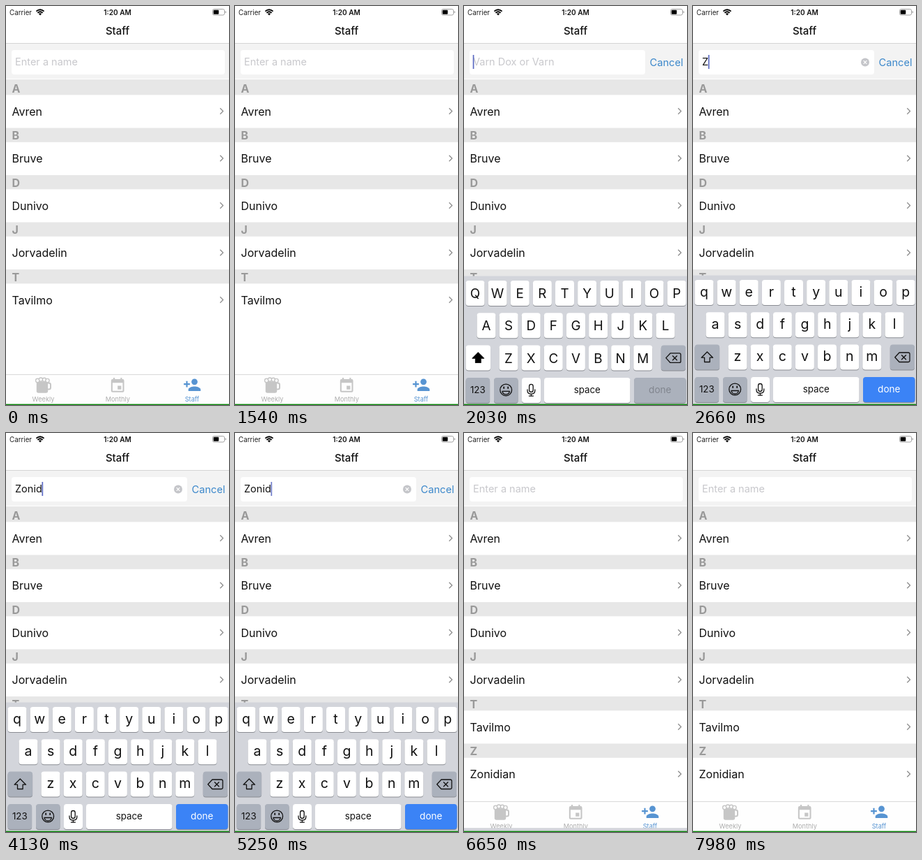
These frames come from a looping animation (320x571 px, 8000 ms). An HTML page:

```html
<!DOCTYPE html>
<html lang="en">
<head>
<meta charset="utf-8">
<title>Staff list</title>
<style>
html, body { margin: 0; width: 100%; height: 100%; overflow: hidden; background: #fff; }
svg { display: block; width: 100vw; height: 100vh; font-family: Inter, Roboto, sans-serif; }
.mid { text-anchor: middle; }
.hidden { display: none; }
.cap { fill: #fff; }
.mod { fill: #abb1bc; }
.line { fill: none; stroke: #111; stroke-width: 1.3; stroke-linejoin: round; stroke-linecap: round; }
</style>
</head>
<body>
<svg id="stage" viewBox="0 0 320 571" preserveAspectRatio="none"></svg>
<script>
const LOOP = 8000;
const FOCUS = 1610, RISE = 1648, DONE = 6300, FALL = 6370, ADDED = 6440;
const KEYBOARD_HEIGHT = 185;
const NAME = 'Zonidian';
const TYPED_AT = [2170, 3290, 3780, 4130, 4130, 5320, 5530, 5810];
// [time, cursor opacity], linear in between
const BLINK = [[2660, 1], [2940, 0], [3150, 0], [3500, 1], [3650, 1], [3990, 0], [4129, 0], [4130, 1],
  [4220, 1], [4550, 0], [4700, 0], [5040, 1], [5200, 1], [5319, .7], [5320, 1]];

const rect = (x, y, w, h, fill, r = 0, extra = '') =>
  `<rect x="${x}" y="${y}" width="${w}" height="${h}" rx="${r}" fill="${fill}" ${extra}/>`;
const text = (x, y, size, value, fill = '#111', extra = '') =>
  `<text x="${x}" y="${y}" font-size="${size}" fill="${fill}" ${extra}>${value}</text>`;

function statusBar() {
  return text(5, 12.6, 9.8, 'Carrier', '#222') +
    `<g fill="none" stroke="#000" stroke-width="1.9">
      <path d="M43.4 7.6Q49 2.7 54.6 7.6M45.4 9.9Q49 6.8 52.6 9.9"/></g>
    <path d="M49 13.4l-2.2-2.3q2.2-1.7 4.4 0z"/>` +
    text(160, 12.6, 10.1, '1:20 AM', '#111', 'class="mid" font-weight="600"') +
    rect(296.5, 4.5, 17, 8.5, 'none', 2.2, 'stroke="#999" stroke-width=".9"') +
    rect(297.7, 5.7, 7.6, 6.1, '#000', 1) +
    '<path d="M314.6 7v3.4q1.4-.5 1.4-1.7t-1.4-1.7" fill="#999"/>' +
    text(160, 41, 15, 'Staff', '#111', 'class="mid" font-weight="500"') +
    rect(0, 53, 320, 1, '#d4d4d4');
}

function searchBar() {
  return rect(0, 54, 320, 50, '#f3f3f3') +
    rect(8, 63, 306, 35, '#fff', 4, 'id="field"') +
    text(13, 85.3, 14.5, '', '#c8c8cc', 'id="hint"') +
    text(13, 85.3, 14.5, '', '#111', 'id="entry"') +
    rect(13, 70, 1.7, 20, '#5a69c2', 0, 'id="cursor"') +
    `<g id="clear"><circle cx="247" cy="80.5" r="6" fill="#c5c6ca"/>
      <path d="M244.7 78.2l4.6 4.6m0-4.6l-4.6 4.6" stroke="#fff" stroke-width="1.2"/></g>` +
    text(290.5, 85.5, 14.6, 'Cancel', '#3c88cb', 'id="cancel" class="mid"');
}

function listSection(name, i) {
  const y = 107 + 67.5 * i, top = i ? y : 105;
  return `<g ${i === 5 ? 'id="added"' : ''}>` +
    rect(0, top, 320, y + 20.3 - top, '#e7e7e7') +
    text(8.5, y + 16.6, 16, name[0], '#999', 'font-weight="700"') +
    text(8.5, y + 49.8, 16, name) +
    `<path d="M307.3 ${y + 39.2}l4.2 4.3-4.2 4.3" fill="none" stroke="#8d8d8d" stroke-width="1.3"/></g>`;
}

function tabBar() {
  const label = (x, value, fill) => text(x, 565.6, 9.2, value, fill, 'class="mid"');
  return rect(0, 527, 320, 44, '#fefefe') + rect(0, 527, 320, 1, '#d9d9d9') +
    `<g fill="#fff" stroke="#c6c6c6" stroke-width="1.4">
      <path d="M59 539.5h2.5q2.5 0 2.5 2.5v4q0 2.5-2.5 2.5H59" fill="none" stroke-width="2"/>
      <path d="M44.5 538h15v13q0 2-2 2h-11q-2 0-2-2z" fill="#c6c6c6"/>
      <circle cx="45.3" cy="536" r="2.7"/><circle cx="50" cy="534.6" r="2.6"/>
      <circle cx="55" cy="534.8" r="2.6"/><circle cx="59.5" cy="536" r="2.6"/></g>
    <path fill="#c6c6c6" transform="translate(147.7 531)scale(1.04)" d="M17 12h-5v5h5zM16 1v2H8V1H6v2H5q-2 0-2 2v14q0 2 2 2h14q2 0 2-2V5q0-2-2-2h-1V1zM19 19H5V8h14z"/>
    <g fill="#5794d2" transform="translate(254 529)scale(1.1)"><circle cx="15" cy="8" r="4"/>
      <path d="M6 10V7H4v3H1v2h3v3h2v-3h3v-2zM15 14c-2.7 0-8 1.3-8 4v2h16v-2c0-2.7-5.3-4-8-4"/></g>` +
    label(53.5, 'Weekly', '#adadad') + label(160.3, 'Monthly', '#adadad') + label(267, 'Staff', '#5794d2');
}

function keyCap(x, y, w, kind = 'cap', id = '') {
  return rect(x, y + 1, w, 36, '#898c92', 4) +
    `<rect x="${x}" y="${y}" width="${w}" height="36" rx="4" class="${kind}" ${id && `id="${id}"`}/>`;
}

function keyboard() {
  const rows = [['qwertyuiop', 16, 392], ['asdfghjkl', 32, 438.3], ['zxcvbnm', 64, 484.6]];
  const letters = rows.map(([keys, left, y]) => [...keys].map((key, i) => {
    const x = left + 32.13 * i;
    return keyCap(x - 13.5, y, 27) +
      text(x, y + 23.8, 19.5, key, '#111', 'class="mid lower"') +
      text(x, y + 25, 18.8, key.toUpperCase(), '#111', 'class="mid upper"');
  }).join('')).join('');
  return `<g id="keyboard">${rect(0, 385.5, 320, 187, '#d3d5db')}${letters}` +
    keyCap(2.6, 484.6, 35.5, 'mod', 'shift') + keyCap(282.8, 484.6, 35.2, 'mod') +
    keyCap(2.6, 531, 34.5, 'mod') + keyCap(43, 531, 34.5, 'mod') + keyCap(83, 531, 27) +
    keyCap(115, 531, 123.5) + keyCap(244, 531, 74.5, 'mod', 'done') +
    `<path id="arrow" class="line" d="M20.3 495l8.2 8.2h-4.4v6.3h-7.6v-6.3h-4.4z"/>
    <path class="line" d="M296 496h13q2 0 2 2v9.5q0 2-2 2h-13l-6.2-6.8zM299.5 499.8l6 6m0-6l-6 6"/>
    <g class="line"><circle cx="60.2" cy="548.5" r="8.4"/><path d="M55 550.5h10.4q-.8 4.5-5.2 4.5t-5.2-4.5"/>
      <path d="M57.2 544.5v1.6m6-1.6v1.6" stroke-width="1.8"/>
      <rect x="93.6" y="540.5" width="5.6" height="11" rx="2.8"/>
      <path d="M91 548v1.5q0 4.6 5.4 4.6t5.4-4.6V548M96.4 554.1v3m-3 0h6"/></g>` +
    text(19.8, 553.3, 13.3, '123', '#111', 'class="mid"') +
    text(176.7, 553, 13.3, 'space', '#111', 'class="mid"') +
    text(281.3, 553, 13.6, 'done', '#fff', 'id="doneText" class="mid"') + '</g>';
}

const stage = document.getElementById('stage');
const people = ['Avren', 'Bruve', 'Dunivo', 'Jorvadelin', 'Tavilmo', NAME];
stage.innerHTML = rect(0, 0, 320, 571, '#fff') + statusBar() + searchBar() +
  people.map(listSection).join('') + tabBar() + keyboard() + rect(0, 569.6, 320, 1.4, '#0a850a');

const el = id => document.getElementById(id);
const show = (node, on) => node.classList.toggle('hidden', !on);
const setText = (node, value) => { if (node.textContent !== value) node.textContent = value; };
const lowers = stage.querySelectorAll('.lower'), uppers = stage.querySelectorAll('.upper');

// Critically damped spring: 0 at the start, approaching 1
function spring(ms) {
  const x = Math.max(0, ms) * .0193;
  return 1 - (1 + x) * Math.exp(-x);
}

function cursorOpacity(t) {
  const i = BLINK.findIndex(([time]) => time > t);
  if (i < 1) return 1;
  const [t0, a] = BLINK[i - 1], [t1, b] = BLINK[i];
  return a + (b - a) * (t - t0) / (t1 - t0);
}

function render(t) {
  const open = t >= FOCUS && t < ADDED;
  const editing = t >= FOCUS && t < DONE;
  const typed = open ? NAME.slice(0, TYPED_AT.filter(time => time <= t).length) : '';
  const upper = !typed && t < DONE;

  el('field').setAttribute('width', open ? 252 : 306);
  setText(el('hint'), typed ? '' : open ? 'Varn Dox or Varn' : 'Enter a name');
  setText(el('entry'), typed);
  show(el('cancel'), open);
  show(el('clear'), editing && typed);
  show(el('cursor'), editing);
  el('cursor').setAttribute('x', 12.7 + (typed ? el('entry').getComputedTextLength() : 0));
  el('cursor').setAttribute('opacity', cursorOpacity(t));
  show(el('added'), t >= ADDED);

  const raised = t < FALL ? spring(t - RISE) : 1 - spring(t - FALL);
  el('keyboard').setAttribute('transform', `translate(0 ${KEYBOARD_HEIGHT * (1 - raised)})`);
  show(el('keyboard'), raised > .003);
  lowers.forEach(node => show(node, !upper));
  uppers.forEach(node => show(node, upper));
  el('shift').setAttribute('class', upper ? 'cap' : 'mod');
  el('arrow').style.fill = upper ? '#000' : 'none';
  el('done').style.fill = upper ? '#abb1bc' : '#3b83f6';
  el('doneText').setAttribute('fill', upper ? '#80858e' : '#fff');
}

const start = performance.now();
function tick() {
  render((performance.now() - start) % LOOP);
  requestAnimationFrame(tick);
}
tick();
</script>
</body>
</html>
```
